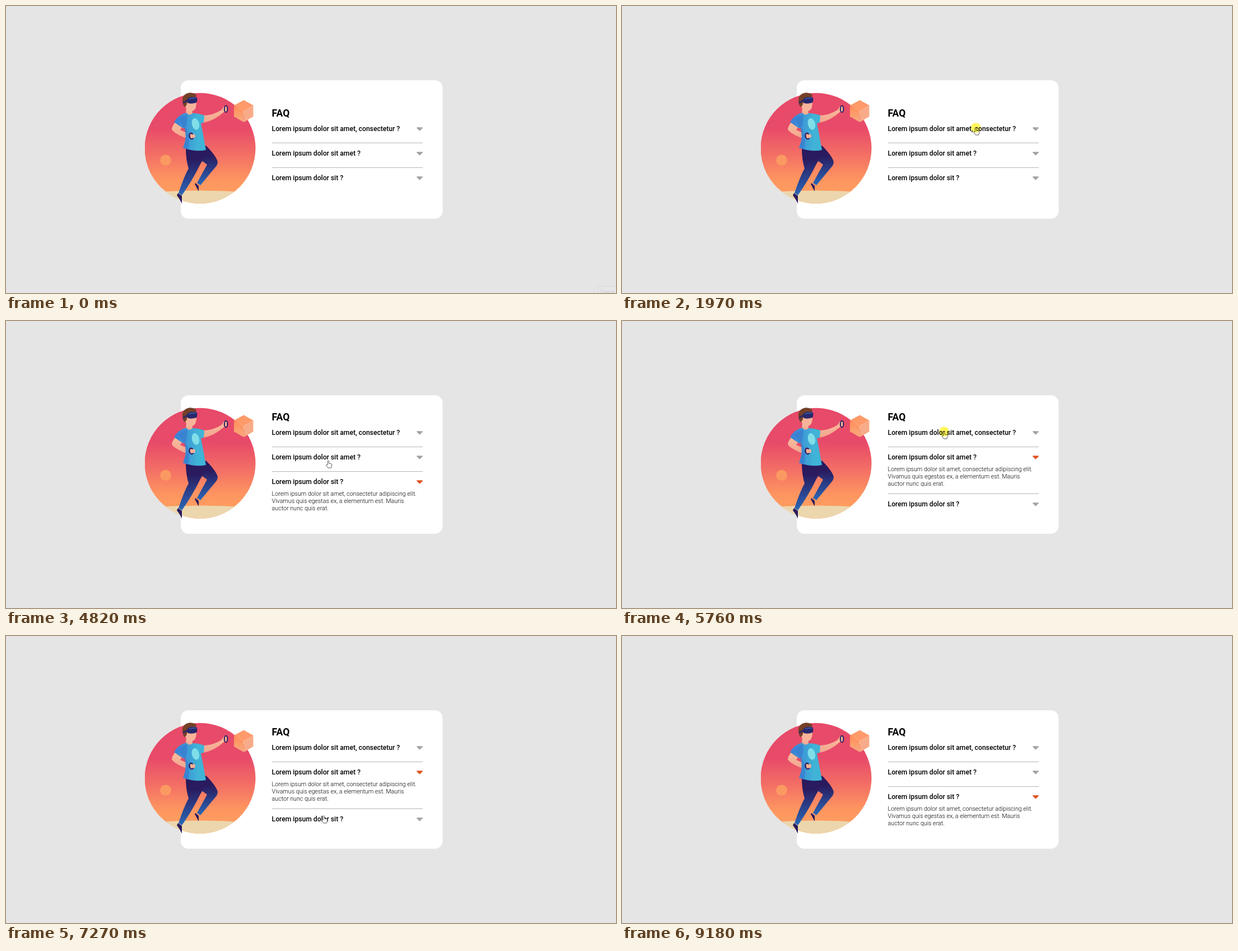
Write an HTML page that moves like this. It is 1089 by 514 pixels and loops after 9.64 s.

```html
<!DOCTYPE html>
<html lang="en">
<head>
<meta charset="utf-8">
<title>FAQ accordion</title>
<style>
  html, body { margin: 0; width: 100%; height: 100%; overflow: hidden; background: #e5e5e5; }
  svg { display: block; font-family: Roboto, sans-serif; }
  .title { font-size: 17.5px; font-weight: 700; }
  .question { font-size: 12.13px; font-weight: 500; }
  .answer { font-size: 10.68px; font-weight: 300; }
  .mark { fill: #a3a3a3; stroke: #a3a3a3; stroke-width: 1.6; stroke-linejoin: round; }
  .open .mark { fill: #e0531f; stroke: #e0531f; }
  .item:not(.open) .answer { visibility: hidden; }
  #click { mix-blend-mode: multiply; }
</style>
</head>
<body>
<svg width="1089" height="514" viewBox="0 0 1089 514">
  <defs>
    <linearGradient id="sky" x2="0" y2="1">
      <stop offset=".32" stop-color="#e84a69"/>
      <stop offset=".56" stop-color="#f36f65"/>
      <stop offset=".78" stop-color="#fe9560"/>
      <stop offset="1" stop-color="#ffa35f"/>
    </linearGradient>
    <linearGradient id="shirt">
      <stop offset=".1" stop-color="#3c82d6"/>
      <stop offset=".75" stop-color="#40b3d6"/>
    </linearGradient>
    <linearGradient id="pants" x2="0" y2="1">
      <stop offset=".25" stop-color="#2a1a5e"/>
      <stop offset="1" stop-color="#2a68b8"/>
    </linearGradient>
    <linearGradient id="skin" x2="0" y2="1">
      <stop stop-color="#f9bd9c"/>
      <stop offset="1" stop-color="#f3a58f"/>
    </linearGradient>
    <linearGradient id="side" x2="0" y2="1">
      <stop stop-color="#ff8c56"/>
      <stop offset="1" stop-color="#f9ab80"/>
    </linearGradient>
    <clipPath id="disc"><circle cx="346.5" cy="254.8" r="99"/></clipPath>
  </defs>

  <rect x="312" y="133" width="467.5" height="248" rx="14" fill="#fff"/>

  <g clip-path="url(#disc)">
    <rect x="248" y="155" width="198" height="199" fill="url(#sky)"/>
    <path d="M270 333Q346 328 422 333V360H270z" fill="#ecd6ad"/>
  </g>
  <circle cx="285" cy="276.3" r="9.8" fill="#fb9962"/>

  <!-- cube -->
  <path d="M424.5 168.5 441.5 178 424.5 188 407 178z" fill="#ff9a6b"/>
  <path d="M407 178 424.5 188V208L407 198z" fill="url(#side)"/>
  <path d="M441.5 178 424.5 188V208L441.5 198z" fill="#f8ab88"/>

  <!-- legs -->
  <path d="M345 254 357 250Q372 265 377 276Q379 281 376 286L347 321 341 317 359 284 340 270z" fill="url(#pants)"/>
  <path d="M321 255 356 252Q361 262 347 283Q333 312 314 339L308 335Q318 305 326 291Q321 275 321 255z" fill="url(#pants)"/>
  <path d="M338 317 344 322V332L337 319zM307 335 314 340V354Q310 345 305 339z" fill="#2a1a5e"/>

  <!-- arms and neck -->
  <g fill="url(#skin)">
    <path d="M350 196Q370 196 385 186L389 180 395 181V188L389 190Q371 206 352 209z"/>
    <path d="M303 207Q296 216 296 221Q299 227 317 235L329 238V230L311 222 317 213z"/>
    <path d="M322 180 321 195Q327 200 333 195L332 180z"/>
  </g>
  <ellipse cx="392.6" cy="184.5" rx="2.8" ry="5.7" fill="#f7b49a" stroke="#2a1f62" stroke-width="2"/>

  <!-- shirt -->
  <path d="M322 191Q327 198 333 192Q343 192 354 196L353 209 348 210Q352 230 357 258Q338 262 316 254Q324 235 320 218L316 219 300 208Q308 194 322 191z" fill="url(#shirt)"/>
  <path d="M320 218Q325 205 323 194Q316 195 309 203L318 219Q324 235 316 254L325 257Q331 235 320 218z" fill="#367bd0" opacity=".65"/>
  <ellipse cx="338.3" cy="211.5" rx="6.5" ry="10.5" transform="rotate(-14 338 211)" fill="#80dee9"/>
  <ellipse cx="331" cy="233" rx="3.5" ry="5.2" transform="rotate(-15 331 233)" fill="#f6b097" stroke="#2a1f62" stroke-width="2.4"/>
  <path d="M329 231 336 229Q339 232 337 236L330 237z" fill="#f6b097"/>

  <!-- head -->
  <path d="M319 172Q320 183 324 186Q329 190 335 187Q340 184 340 172z" fill="#f7b49a"/>
  <path d="M317 179Q312 165 319 159Q328 152 339 158Q341 162 337 164L326 166 322 178 319 181z" fill="#744028"/>
  <path d="M316 172 323 168Q325 164 330 163L340 163Q343 168 340 173Q332 176 325 174L323 171 316 175z" fill="#28286c"/>
  <path d="M327 166.500Q333 164 339 165" fill="none" stroke="#3f62b4" stroke-width="1.5"/>

  <g id="faq"></g>
  <path id="cursor" stroke="#333" stroke-width=".8" stroke-linejoin="round"/>
  <circle id="click" r="8.8" fill="#fff65c"/>
  <g id="tip">
    <rect x="1057.5" y="501.5" width="40" height="20" fill="#e6e6e6" stroke="#d9d9d9"/>
    <text x="1061" y="515" font-size="9" fill="#cdcdcd">Gravar</text>
  </g>
</svg>
<script>
const LOOP = 9640, LEFT = 474.6, STEP = 44.2, BODY = 39.6, PRESS = 200;
const $ = s => document.querySelector(s);

const questions = ['Lorem ipsum dolor sit amet, consectetur ?', 'Lorem ipsum dolor sit amet ?', 'Lorem ipsum dolor sit ?'];
const answer = ['Lorem ipsum dolor sit amet, consectetur adipiscing elit.',
  'Vivamus quis egestas ex, a elementum est. Mauris', 'auctor nunc quis erat.'];

// The pointer travels to x, y between two times; a click there may then open an item.
const moves = [
  { from: 530, to: 1300, x: 569, y: 206 },
  { from: 1300, to: 1710, x: 631.6, y: 218, item: 0, opens: 2110 },
  { from: 2400, to: 2720, x: 601.7, y: 282, item: 1, opens: 3110 },
  { from: 3250, to: 3800, x: 570, y: 330, item: 2, opens: 4140 },
  { from: 4480, to: 4820, x: 575.5, y: 250, item: 1, opens: 5160 },
  { from: 5200, to: 5720, x: 575, y: 198, item: 0, opens: 5960 },
  { from: 6100, to: 6700, x: 570, y: 290, item: 1, opens: 6900 },
  { from: 7070, to: 7400, x: 567, y: 328, item: 2, opens: 7680 },
  { from: 7700, to: 9180, x: 986, y: 514 }
];

const shapes = {
  arrow: 'M0 0V11.5l2.7-2.5 1.7 4 1.7-.7-1.7-3.9H8z',
  hand: 'M-1.3 7.500V1.2a1.2 1.2 0 0 1 2.4 0V5l4 .9q1.3.3 1.2 1.7L5.8 10 5 13H-.5L-3.6 8.6q-.5-1.2.7-1.6z',
  beam: 'M-2.4-5.5H2.4M0-5.5V5.5M-2.4 5.5H2.4'
};

const line = (cls, y, str) => `<text class="${cls}" x="${LEFT}" y="${y}">${str}</text>`;
$('#faq').innerHTML = line('title', 198, 'FAQ') + questions.map((q, i) => `<g class="item">
  ${line('question', 0, q)}
  <path class="mark" d="M733.8-6H743.2L738.5-1.2z"/>
  ${answer.map((a, k) => line('answer', 21 + 13 * k, a)).join('')}
  ${i < 2 ? '<rect class="rule" x="475" width="269" height="1" fill="#b3b3b3"/>' : ''}
</g>`).join('');
const items = [...document.querySelectorAll('.item')];

const baseline = (i, open) =>
  224 + STEP * i - (open < 0 ? 0 : BODY / 2) + (open >= 0 && i > open ? BODY : 0);

function pointer(t) {
  let x = 908, y = 461;
  for (const m of moves) {
    const left = 1 - Math.min(1, Math.max(0, (t - m.from) / (m.to - m.from)));
    const ease = 1 - left * left;
    x += (m.x - x) * ease;
    y += (m.y - y) * ease;
  }
  return [x, y];
}

function shapeAt(x, y, open) {
  if (x < 475 || x > 744) return 'arrow';
  for (let i = 0; i < 3; i++) {
    const d = y - baseline(i, open);
    if (d > -17 && d < 9) return 'hand';
    if (i === open && d >= 9 && d < 50) return 'beam';
  }
  return 'arrow';
}

const show = (el, on) => el.setAttribute('visibility', on ? 'visible' : 'hidden');
const place = (el, x, y) => el.setAttribute('transform', `translate(${x} ${y})`);

function draw(now) {
  const t = now % LOOP;
  const open = moves.reduce((o, m) => t >= m.opens ? m.item : o, -1);

  place($('.title'), 0, open < 0 ? 0 : -20);
  items.forEach((el, i) => {
    const y = baseline(i, open), rule = el.querySelector('.rule');
    place(el, 0, Math.floor(y));
    el.classList.toggle('open', i === open);
    if (rule) rule.setAttribute('y', 20.7 + y % 1 + (i === open ? BODY : 0));
  });

  const [x, y] = pointer(t), shape = shapeAt(x, y, open), cursor = $('#cursor');
  place(cursor, x, y);
  place($('#click'), x, y);
  cursor.setAttribute('d', shapes[shape]);
  cursor.setAttribute('fill', shape === 'beam' ? 'none' : '#fff');
  show(cursor, t >= 530 && t < 9180);
  show($('#click'), moves.some(m => t >= m.opens - PRESS && t < m.opens));
  show($('#tip'), t < 70);
}

let start;
function frame(now) {
  start ??= now;
  draw(now - start);
  requestAnimationFrame(frame);
}
draw(0);
requestAnimationFrame(frame);
</script>
</body>
</html>
```
